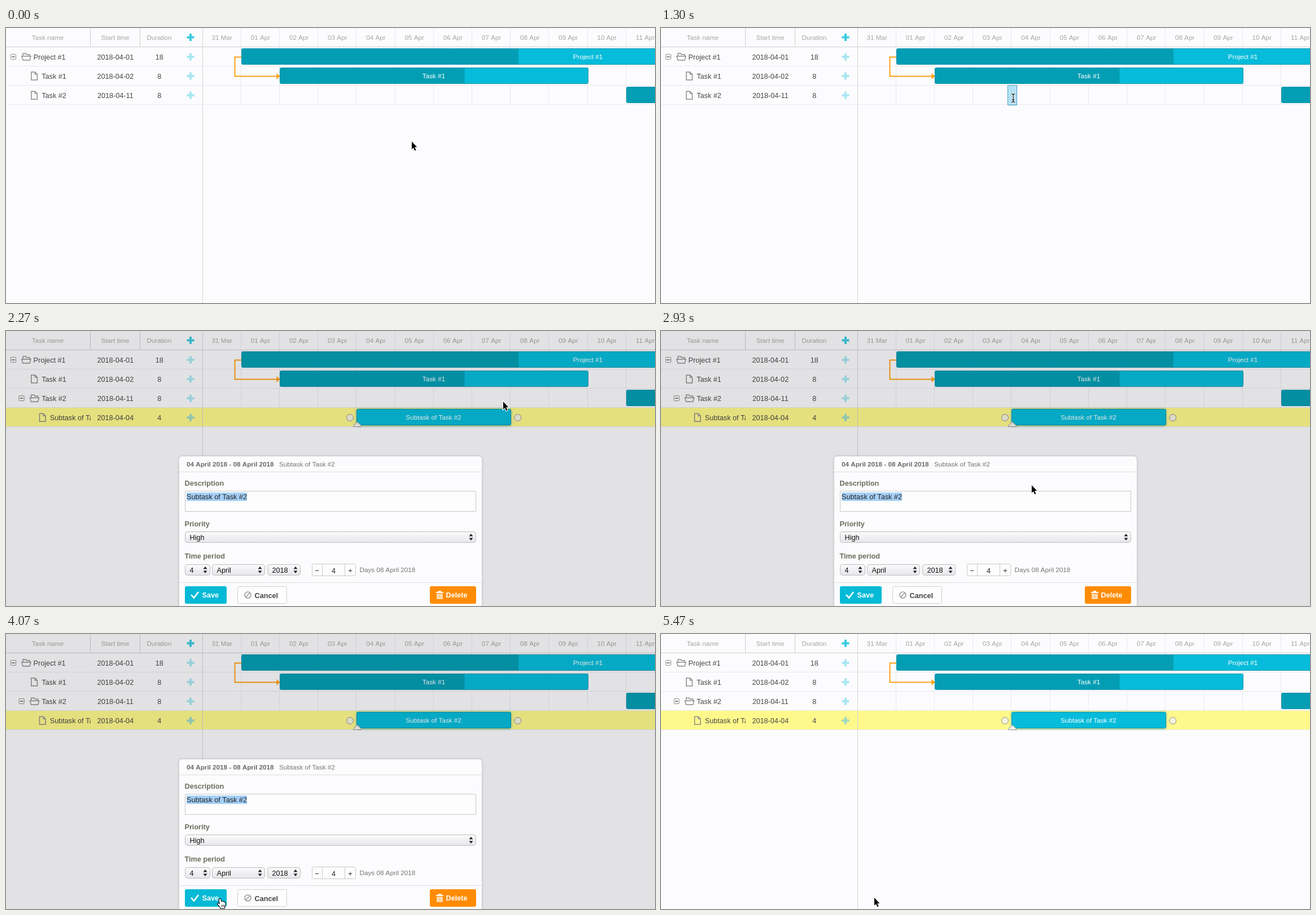
Recreate the animation shown at these times as an HTML page with a canvas. Size 1150 px wide and 487 px high, loop 5510 ms.

```html
<!DOCTYPE html>
<html lang="en">
<head>
<meta charset="utf-8">
<title>Gantt chart</title>
<style>
html, body { margin: 0; width: 100%; height: 100%; overflow: hidden; background: #fcfcfe; }
canvas { display: block; }
</style>
</head>
<body>
<canvas id="stage" width="1150" height="487"></canvas>
<script>
const ctx = document.getElementById('stage').getContext('2d');
const W = 1150, H = 487, LOOP = 5510;
const DAY = 68.2, X0 = 348.6;
const SMALL = 11.7, NORMAL = 12.67;
const DRAG_FROM = 1215, DRAG_TO = 1855, OPEN = 2100, CLOSE = 4130, RELEASE = 4800;
const PAPER = '#fcfcfe', LINE = '#e9e9ef', EDGE = '#cfcfd2';
const TASK = '#06bcda', DONE = '#049eb4', RIM = '#0f93ab', ICON = '#8c8c8c';

const dayX = d => X0 + d * DAY;
const rowY = r => 34 + r * 34.1;

function rect(x, y, w, h, fill) {
  ctx.fillStyle = fill;
  ctx.fillRect(x, y, w, h);
}

function paint(fill, stroke, width = 1) {
  if (fill) { ctx.fillStyle = fill; ctx.fill(); }
  if (stroke) { ctx.strokeStyle = stroke; ctx.lineWidth = width; ctx.stroke(); }
}

function box(x, y, w, h, r, fill, stroke) {
  ctx.beginPath();
  ctx.roundRect(x, y, w, h, r);
  paint(fill, stroke);
}

function poly(points, fill, stroke, width, closed = true) {
  ctx.beginPath();
  points.forEach(([x, y]) => ctx.lineTo(x, y));
  if (closed) ctx.closePath();
  paint(fill, stroke, width);
}

function text(s, x, y, size, color, align = 'left', weight = '') {
  ctx.font = `${weight} ${size}px "Liberation Sans", Arial, sans-serif`;
  ctx.textAlign = align;
  ctx.fillStyle = color;
  ctx.fillText(s, x, y);
}

const hline = (x, y, w, color) => rect(x, y, w, 1, color);
const vline = (x, y, h, color) => rect(x, y, 1, h, color);

function plus(x, y, color) {
  rect(x - 6.5, y - 2, 13, 4, color);
  rect(x - 2, y - 6.5, 4, 13, color);
}

function toggle(x, y) {
  box(x + .5, y - 4.5, 9, 9, 1, null, ICON);
  rect(x + 2.5, y - .5, 5, 1.2, '#333');
}

function folder(x, y) {
  poly([[x + 3, y - 1], [x + 3, y - 6], [x + 8, y - 6], [x + 9.5, y - 4], [x + 15, y - 4], [x + 15, y - 1]], null, ICON, 1.4, false);
  poly([[x + .8, y - 1], [x + 17, y - 1], [x + 15, y + 6], [x + 3, y + 6]], null, ICON, 1.4);
}

function file(x, y) {
  poly([[x + 1, y - 7], [x + 7.5, y - 7], [x + 11.5, y - 3], [x + 11.5, y + 7], [x + 1, y + 7]], null, ICON, 1.5);
  poly([[x + 7.5, y - 7], [x + 7.5, y - 3], [x + 11.5, y - 3]], null, ICON, 1.3, false);
}

function gridRow(i, name, start, days, level, open) {
  const y = rowY(i) + 17, x = 8 + level * 14.6;
  if (open) { toggle(x, Math.round(y)); folder(x + 19, y); }
  else file(x + 21.3, y);
  ctx.save();
  ctx.beginPath();
  ctx.rect(0, y - 17, 150, 34);
  ctx.clip();
  text(name, x + 40.6, y + 4.5, NORMAL, '#484848');
  ctx.restore();
  text(start, 193.8, y + 4.5, NORMAL, '#484848', 'center');
  text(days, 271.7, y + 4.5, NORMAL, '#484848', 'center');
  plus(327, y, i === 3 ? '#9edac4' : '#a9e6f2');
}

function bar(row, day, days, progress, label) {
  const x = Math.round(dayX(day)), y = Math.round(rowY(row)) + 2, w = Math.round(days * DAY);
  box(x + .5, y + .5, w, 28, 2, TASK, RIM);
  if (progress) rect(x + 1, y + 1, w * progress - 1, 27, DONE);
  text(label, x + w / 2, y + 19, SMALL, '#fff', 'center');
}

function subtask() {
  ctx.save();
  ctx.shadowColor = '#299cb4';
  ctx.shadowBlur = 5;
  rect(622, 139, 272, 28, TASK);
  ctx.restore();
  bar(3, 4, 4, 0, 'Subtask of Task #2');
  for (const x of [609.5, 906.8]) {
    ctx.beginPath();
    ctx.arc(x, 153.5, 6, 0, 7);
    paint('#f3f3dc', '#8f8f86');
  }
  poly([[615.5, 169.5], [615.5, 167.5], [622.5, 161], [629.5, 167.5], [629.5, 169.5]], '#f1f1e8', '#8f8f8f');
}

function link() {
  poly([[417, 51.5], [405.5, 51.5], [405.5, 85.5], [481, 85.5]], null, '#ffa011', 2, false);
  poly([[479.5, 80], [485.5, 85.5], [479.5, 91]], '#ffa011');
}

function chart(done) {
  const rows = done ? 4 : 3, bottom = Math.round(rowY(rows));
  rect(0, 0, W, H, PAPER);
  for (let d = 1; d < 12; d++) vline(Math.round(dayX(d)) - 1, 0, bottom, LINE);
  if (done) rect(0, 136, W, 34, '#fff98c');
  hline(0, 33, W, EDGE);
  for (let r = 1; r <= rows; r++) hline(0, Math.round(rowY(r)) - 1, W, LINE);
  for (const x of [149, 237]) vline(x, 0, 33, EDGE);
  vline(348, 0, H, '#d4d4d4');

  const head = (s, x) => text(s, x, 20.5, SMALL, '#a6a6a2', 'center');
  head('Task name', 74);
  head('Start time', 193.5);
  head('Duration', 271.5);
  plus(327, 16.5, '#3fcbe0');
  for (let d = 0; d < 12; d++)
    head(d ? String(d).padStart(2, '0') + ' Apr' : '31 Mar', dayX(d + .5));

  gridRow(0, 'Project #1', '2018-04-01', '18', 0, true);
  gridRow(1, 'Task #1', '2018-04-02', '8', 1, false);
  gridRow(2, 'Task #2', '2018-04-11', '8', 1, done);
  if (done) gridRow(3, 'Subtask of Task #2', '2018-04-04', '4', 2, false);

  link();
  bar(0, 1, 18, .4, 'Project #1');
  bar(1, 2, 8, .6, 'Task #1');
  bar(2, 11, 8, .5, 'Task #2');
  if (done) subtask();
}

function select(x, y, w, label) {
  const g = ctx.createLinearGradient(0, y, 0, y + 20);
  g.addColorStop(0, '#fbfbfd');
  g.addColorStop(1, '#e6e6ea');
  box(x + .5, y + .5, w - 1, 19, 4, g, '#bdbdbd');
  text(label, x + 8.5, y + 14.5, NORMAL, '#111');
  const ax = x + w - 9, ay = y + 10;
  poly([[ax - 3.5, ay - 1.5], [ax, ay - 6], [ax + 3.5, ay - 1.5]], '#222');
  poly([[ax - 3.5, ay + 1.5], [ax, ay + 6], [ax + 3.5, ay + 1.5]], '#222');
}

function saveButton() {
  box(317, 452, 74, 31, 3, '#04bad6');
  poly([[328, 467], [333, 472.5], [341, 462]], null, '#fff', 2.6, false);
  text('Save', 347.5, 472, NORMAL, '#fff', 'left', 'bold');
}

function cancelButton() {
  box(410.5, 452.5, 87, 30, 3, '#fdfdfe', '#cfcfcf');
  ctx.beginPath();
  ctx.arc(428.5, 467.5, 5.5, 0, 7);
  ctx.moveTo(424.5, 471.5);
  ctx.lineTo(432.5, 463.5);
  paint(null, '#9a9a9a', 1.6);
  text('Cancel', 440.5, 472.5, NORMAL, '#454545', 'left', 'bold');
}

function deleteButton() {
  const orange = '#ff8c04';
  box(751, 452, 82, 31, 3, orange);
  rect(762, 462, 13, 2, '#fff');
  rect(766, 460, 5, 2, '#fff');
  rect(763.5, 465.5, 10, 9, '#fff');
  for (const x of [765.5, 768, 770.5]) rect(x, 466.5, 1, 7, orange);
  text('Delete', 779.5, 472, NORMAL, '#fff', 'left', 'bold');
}

function dialog() {
  rect(0, 0, W, H, 'rgba(0,0,0,.1)');
  ctx.save();
  ctx.shadowColor = 'rgba(0,0,0,.2)';
  ctx.shadowBlur = 4;
  box(307, 222, 536, 290, 5, PAPER);
  ctx.restore();
  hline(307, 249, 536, '#dedede');
  hline(307, 445, 536, '#dedede');
  text('04 April 2018 - 08 April 2018', 320, 240, SMALL, '#68686a', 'left', 'bold');
  text('Subtask of Task #2', 484, 240, SMALL, '#757575');

  const caption = (s, y) => text(s, 316.5, y, NORMAL, '#6c6c60', 'left', 'bold');
  caption('Description', 274);
  caption('Priority', 346);
  caption('Time period', 402.5);

  box(317.5, 283.5, 515, 36, 0, '#fdfdfe', '#c8c8c8');
  rect(320, 286, 107, 15, '#a5d0f8');
  text('Subtask of Task #2', 320, 298, NORMAL, '#222');
  select(317, 355, 516, 'High');
  select(317, 413, 45, '4');
  select(365, 413, 94, 'April');
  select(463, 413, 59, '2018');

  box(542.5, 412.5, 77, 21, 2, '#fdfdfe', '#cacaca');
  vline(560, 413, 21, '#cacaca');
  vline(600, 413, 21, '#cacaca');
  rect(548, 424, 6, 1, '#333');
  rect(607, 424, 6, 1, '#333');
  rect(609.5, 421.5, 1, 6, '#333');
  text('4', 580.5, 428.5, NORMAL, '#222', 'center');
  text('Days 08 April 2018', 626.5, 427, SMALL, '#757575');

  saveButton();
  cancelButton();
  deleteButton();
}

// Outline below, fill on top, so the line grows outwards only.
function outlined(points, fill, stroke) {
  poly(points, null, stroke, 2.1);
  poly(points, fill);
}

function arrow(x, y) {
  const shape = [[0, 0], [0, 13.8], [3, 11], [5.3, 16.2], [7.5, 15.3], [5.2, 10], [9.3, 10]];
  outlined(shape.map(([a, b]) => [x + a, y + b]), '#000', '#fff');
}

function ibeam(x, y) {
  ctx.beginPath();
  ctx.moveTo(x - 3, y - 7.5);
  ctx.quadraticCurveTo(x, y - 7.5, x, y - 5);
  ctx.lineTo(x, y + 5);
  ctx.quadraticCurveTo(x, y + 7.5, x - 3, y + 7.5);
  ctx.moveTo(x + 3, y - 7.5);
  ctx.quadraticCurveTo(x, y - 7.5, x, y - 5);
  ctx.moveTo(x, y + 5);
  ctx.quadraticCurveTo(x, y + 7.5, x + 3, y + 7.5);
  ctx.moveTo(x - 2, y + 3);
  ctx.lineTo(x + 2, y + 3);
  paint(null, '#fff', 3);
  paint(null, '#111', 1.2);
}

function hand(x, y) {
  ctx.save();
  ctx.translate(x, y);
  ctx.lineJoin = 'round';
  const shape = [[-2.5, 1.5], [-1, 0], [.5, 1.5], [1.5, 5], [3, 4.5], [4.5, 5.5], [6, 5.3], [7, 6.5],
    [8.5, 7], [8.7, 11], [7, 14.5], [7, 16.5], [0, 16.5], [-.5, 14.5], [-5, 9.5], [-4.3, 7.8], [-1.2, 9.5]];
  outlined(shape, '#fff', '#000');
  for (const a of [1.5, 3.7, 5.9]) rect(a, 10.5, .9, 3.5, '#000');
  ctx.restore();
}

// Pointer stops: time, x, y; each leg eases in and out.
const path = [
  [120, 719, 201], [1170, 614, 124], [DRAG_FROM, 614, 124], [DRAG_TO, 882, 125],
  [2300, 881, 125], [3610, 398, 444], [3850, 380, 469], [RELEASE, 380, 469], [RELEASE + 120, 378, 467]
];
const ease = u => u < .5 ? 2 * u * u : 1 - 2 * (1 - u) ** 2;

function pointer(t) {
  const i = path.findIndex(p => p[0] > t);
  if (i < 1) return path[i ? path.length - 1 : 0].slice(1);
  const [t0, x0, y0] = path[i - 1], [t1, x1, y1] = path[i];
  const k = ease((t - t0) / (t1 - t0));
  return [x0 + (x1 - x0) * k, y0 + (y1 - y0) * k];
}

function marquee(t) {
  const right = Math.round(pointer(Math.min(t + 25, DRAG_TO))[0]);
  box(614.5, 101.5, Math.max(1, right - 614), 35, 0, 'rgba(94,196,236,.45)', '#4a9dc0');
}

function draw(t) {
  chart(t >= OPEN);
  if (t >= DRAG_FROM && t < OPEN) marquee(t);
  if (t >= OPEN && t < CLOSE) dialog();
  const [x, y] = pointer(t);
  if (t >= 1170 && t < OPEN) ibeam(x + .5, y);
  else if (t >= 3700 && t < RELEASE) hand(x, y);
  else arrow(x, y);
}

const begin = performance.now();
function tick() {
  draw((performance.now() - begin) % LOOP);
  requestAnimationFrame(tick);
}
tick();
</script>
</body>
</html>
```
